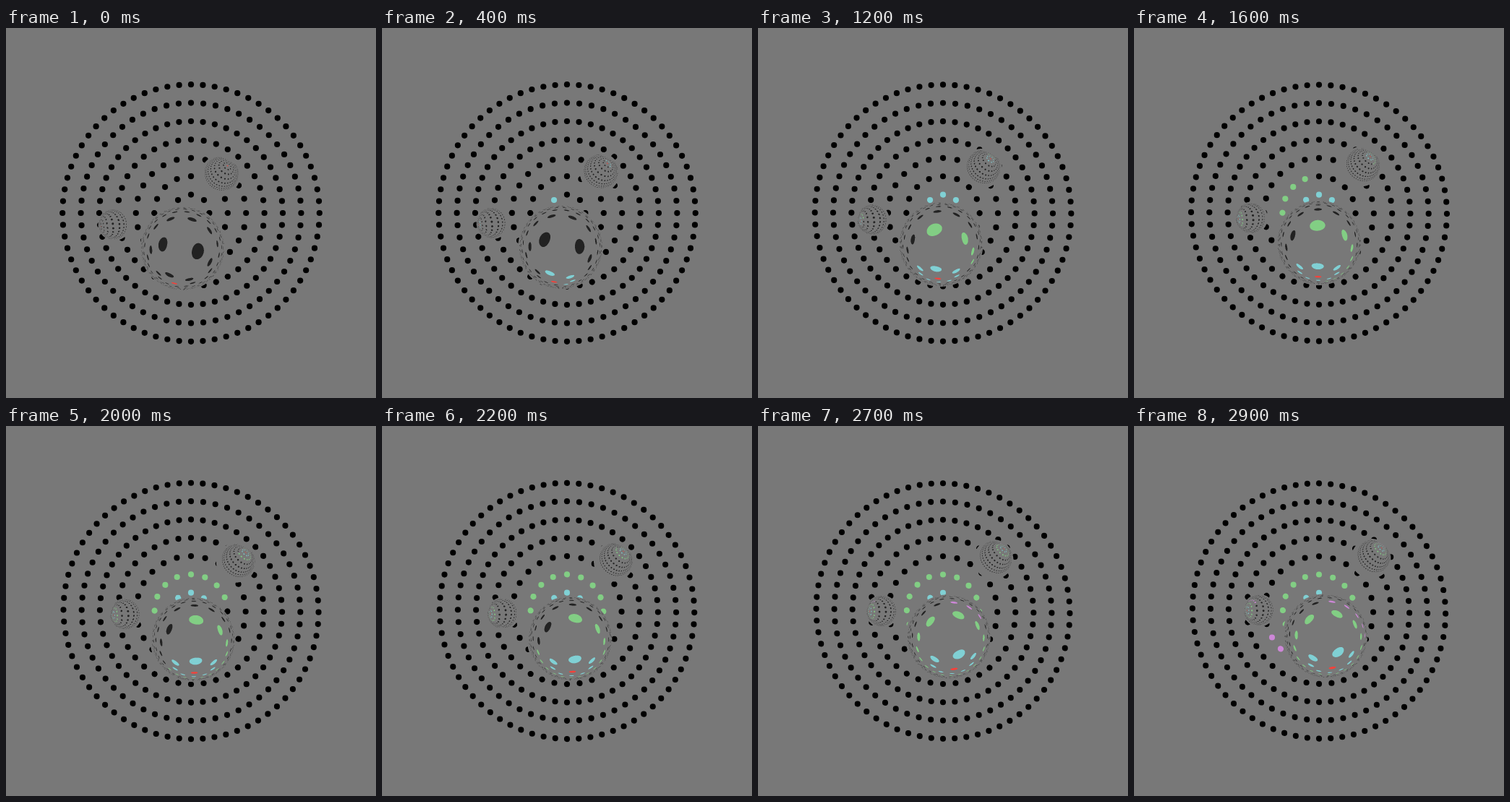
Write an HTML page with a canvas that moves like this. It is 512 px wide and 512 px high and loops after 3 s.

```html
<!DOCTYPE html>
<html>
<head>
<meta charset="utf-8">
<title>Glass balls over dotted rings</title>
<style>
  html, body { margin: 0; width: 100%; height: 100%; overflow: hidden; background: #787878; }
  canvas { display: block; }
</style>
</head>
<body>
<canvas id="stage" width="512" height="512"></canvas>
<script>
const ctx = document.getElementById('stage').getContext('2d');
const SIZE = 512, MID = 256, STEPS = 30, STEP_MS = 100;
const GAP = 25.4, DOT = 4.1, GLASS = 1.5, SAMPLES = 3;
const GRAY = [120, 120, 120], BLACK = [0, 0, 0];
const GLASS_FLOOR = 34;          // darkest tone seen through glass
const COLORS = [[245, 65, 58], [128, 208, 212], [130, 206, 132], [205, 135, 215]];
const COUNTS = [1, 8, 16, 24, 36, 48, 56, 68];
const YAW_STEP = 0.006, PITCH_STEP = 0.004;

const balls = [
  { c: [-11.5, 48.6, 113], r: 58.8 },
  { c: [-106, 15.6, 124], r: 22.5 },
  { c: [41, -53, 182], r: 27.5 }
];

const starts = [];
COUNTS.reduce((sum, n, i) => (starts[i] = sum) + n, 0);

const dot = (a, b) => a[0] * b[0] + a[1] * b[1] + a[2] * b[2];
const sub = (a, b) => [a[0] - b[0], a[1] - b[1], a[2] - b[2]];
const along = (a, b, s) => [a[0] + b[0] * s, a[1] + b[1] * s, a[2] + b[2] * s];

// Dots run clockwise from the bottom of each ring.
function dotPlace(ring, k) {
  const a = 2 * Math.PI * k / COUNTS[ring];
  return [-Math.sin(a) * ring * GAP, Math.cos(a) * ring * GAP];
}

function dotColor(ring, k, step) {
  return starts[ring] + k <= step ? COLORS[ring] : BLACK;
}

function planeColor(x, y, step) {
  const ring = Math.round(Math.hypot(x, y) / GAP);
  if (ring >= COUNTS.length) return GRAY;
  const n = COUNTS[ring];
  const k = (Math.round(Math.atan2(-x, y) / (2 * Math.PI) * n) + n) % n;
  const [dx, dy] = dotPlace(ring, k);
  return Math.hypot(x - dx, y - dy) < DOT ? dotColor(ring, k, step) : GRAY;
}

function nearestHit(p, d) {
  let best = null;
  for (const ball of balls) {
    const oc = sub(p, ball.c), b = dot(oc, d);
    const disc = b * b - dot(oc, oc) + ball.r * ball.r;
    if (disc <= 0) continue;
    const t = -b - Math.sqrt(disc);
    if (t > 0.01 && (!best || t < best.t)) best = { t, ball };
  }
  return best;
}

function trace(p, d, step) {
  let floor = 0;
  for (let i = 0; i < 4; i++) {
    const hit = nearestHit(p, d);
    if (!hit) break;
    const { c, r } = hit.ball;
    p = along(p, d, hit.t);
    const n = sub(p, c).map(v => v / r);
    const cosOut = -dot(d, n);
    const cosIn = Math.sqrt(1 - (1 - cosOut * cosOut) / (GLASS * GLASS));
    d = along(d.map(v => v / GLASS), n, cosOut / GLASS - cosIn);
    p = along(p, d, 2 * r * cosIn);
    const m = sub(p, c).map(v => v / r);
    d = along(d.map(v => v * GLASS), m, cosOut - GLASS * cosIn);
    floor = GLASS_FLOOR;
  }
  if (d[2] > -1e-4) return GRAY;
  const s = -p[2] / d[2];
  return planeColor(p[0] + d[0] * s, p[1] + d[1] * s, step).map(v => Math.max(v, floor));
}

// Screen right, screen down and toward the eye, as directions in the scene.
function viewAxes(yaw, pitch) {
  const ca = Math.cos(yaw), sa = Math.sin(yaw);
  const cb = Math.cos(pitch), sb = Math.sin(pitch);
  return [[ca, 0, sa], [sa * sb, cb, -ca * sb], [-sa * cb, sb, ca * cb]];
}

function drawPlane(step, [right, down]) {
  ctx.setTransform(1, 0, 0, 1, 0, 0);
  ctx.fillStyle = `rgb(${GRAY})`;
  ctx.fillRect(0, 0, SIZE, SIZE);
  ctx.setTransform(right[0], down[0], right[1], down[1], MID, MID);
  COUNTS.forEach((n, ring) => {
    for (let k = 0; k < n; k++) {
      const [x, y] = dotPlace(ring, k);
      ctx.fillStyle = `rgb(${dotColor(ring, k, step)})`;
      ctx.beginPath();
      ctx.arc(x, y, DOT, 0, 2 * Math.PI);
      ctx.fill();
    }
  });
}

function drawBall({ c, r }, step, [right, down, toEye]) {
  const left = Math.floor(MID + dot(c, right) - r) - 1;
  const top = Math.floor(MID + dot(c, down) - r) - 1;
  const side = Math.ceil(2 * r) + 3;
  const image = ctx.createImageData(side, side);
  const eye = toEye.map(v => v * 500), ray = toEye.map(v => -v);

  for (let i = 0; i < side * side; i++) {
    const sum = [0, 0, 0];
    for (let j = 0; j < SAMPLES * SAMPLES; j++) {
      const x = left + i % side + (j % SAMPLES + 0.5) / SAMPLES - MID;
      const y = top + Math.floor(i / side) + (Math.floor(j / SAMPLES) + 0.5) / SAMPLES - MID;
      const color = trace(along(along(eye, right, x), down, y), ray, step);
      for (let k = 0; k < 3; k++) sum[k] += color[k];
    }
    for (let k = 0; k < 3; k++) image.data[i * 4 + k] = sum[k] / (SAMPLES * SAMPLES);
    image.data[i * 4 + 3] = 255;
  }
  ctx.putImageData(image, left, top);
}

function draw(step) {
  const axes = viewAxes(step * YAW_STEP, step * PITCH_STEP);
  drawPlane(step, axes);
  for (const ball of balls) drawBall(ball, step, axes);
}

let shown = -1;
function tick() {
  const step = Math.floor(performance.now() / STEP_MS) % STEPS;
  if (step !== shown) draw(shown = step);
  requestAnimationFrame(tick);
}
tick();
</script>
</body>
</html>
```
